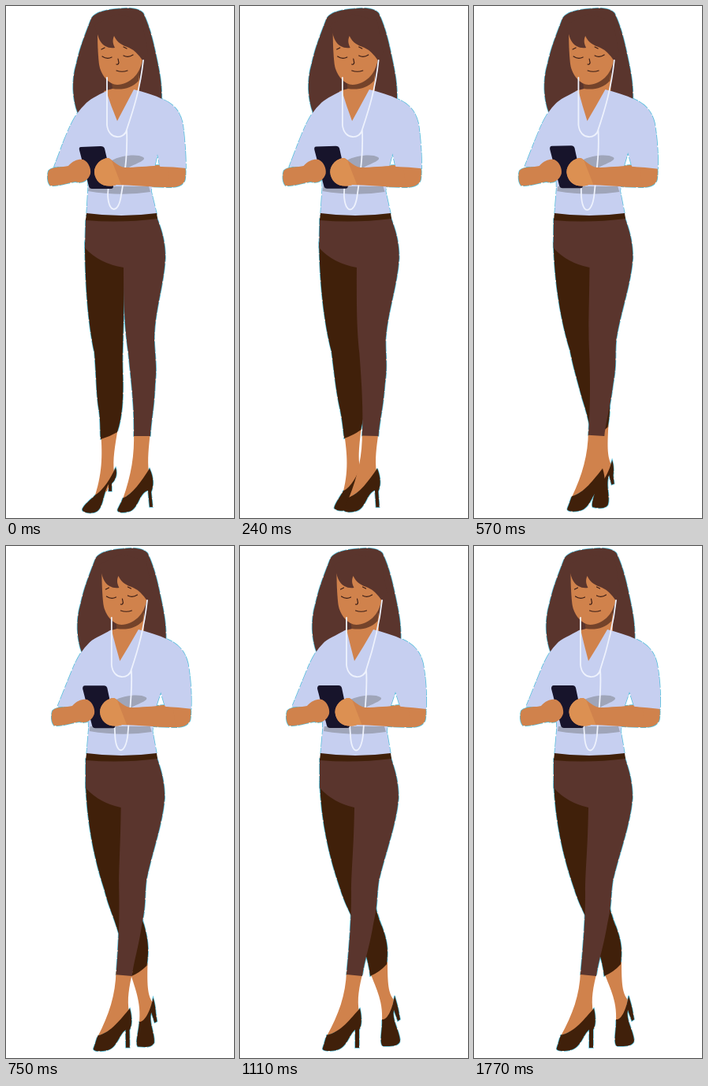
Animation, 289 px wide and 650 px high, one loop 1800 ms. Source, as an HTML page:

```html
<!DOCTYPE html>
<html lang="en">
<head>
<meta charset="utf-8">
<title>Walking with a phone</title>
<style>
  html, body { margin: 0; width: 100%; height: 100%; overflow: hidden; background: #fff; }
  svg { display: block; width: 100%; height: 100%; }
</style>
</head>
<body>
<svg id="stage" viewBox="0 0 289 650"><g id="fringe"></g><g id="body"></g></svg>
<script>
const LOOP = 1800, STEP = 30, STRIDE = 900;
const SKIN = '#d0824c', HAND = '#dc9052', BROWN = '#5a352d', DARK = '#40200a',
      SHIRT = '#c6cff0', SHADE = '#9fa5b9', PHONE = '#17142b', CORD = '#eef2fd', LINE = '#3a1d16';

const NS = 'http://www.w3.org/2000/svg';
const fringe = document.getElementById('fringe');
const body = document.getElementById('body');
const movers = [];

const numbers = path => path.match(/-?[\d.]+/g).map(Number);

// Blends two paths that share the same commands.
function blend(from, to) {
  const a = numbers(from), b = numbers(to);
  return p => {
    let i = 0;
    return from.replace(/-?[\d.]+/g, () => (a[i] + (b[i++] - a[i - 1]) * p).toFixed(2));
  };
}

function addPath(parent, attributes, path, change) {
  const node = document.createElementNS(NS, 'path');
  for (const key in attributes) node.setAttribute(key, attributes[key]);
  node.setAttribute('d', path);
  parent.append(node);
  if (typeof change === 'number') {
    movers.push(p => node.setAttribute('transform', `translate(${change * p})`));
  } else {
    const shape = blend(path, change);
    movers.push(p => node.setAttribute('d', shape(p)));
  }
}

// `change` is either a horizontal shift or the path at the end of the stride.
function fill(color, path, change, edged = false) {
  if (edged) {
    addPath(fringe, { fill: 'none', stroke: '#55bfdc', 'stroke-width': 1.5,
      'stroke-dasharray': '14 1 8 2' }, path, change);
  }
  addPath(body, { fill: color }, path, change);
}

function line(color, width, path, change) {
  addPath(body, { fill: 'none', stroke: color, 'stroke-width': width,
    'stroke-linecap': 'round', 'stroke-linejoin': 'round' }, path, change);
}

// Far leg
fill(SKIN, 'M120 540C122 565 123 590 113 621L128 616L137 592C135 575 138 560 142 535Z',
           'M164 538C170 558 182 575 180 604L188 606L195 576C188 568 187 555 187 528Z');
fill(DARK, 'M139 586C142 595 138 603 134 606L134 616L130 616L130 607C122 620 124 640 112 643C104 645 95 642 97 638C100 632 108 626 113 621C124 614 132 600 139 586Z',
           'M196 571C198 578 200 584 201 590L203 601L200 603L195 589C192 601 202 615 203 628C201 636 190 635 181 635C176 630 181 612 180 601C187 602 193 588 196 571Z', true);
fill(DARK, 'M100 300C100 350 104 405 112 440C115 475 114 490 118 515C120 530 119 540 120 550Q131 547 141 541C148 520 149 495 148 465C147 440 150 400 150 330Z',
           'M101 300C103 350 113 395 127 435C134 458 141 466 147 485C155 505 163 525 165 546Q177 541 186 531C188 512 187 502 180 483C173 465 165 440 147 330Z', true);

// Near leg
fill(SKIN, 'M162 540C163 570 159 595 148 626L166 612L181 592C179 575 181 560 183 540Z',
           'M135 540C134 570 125 595 110 622L133 611L151 592C148 575 151 560 156 540Z');
fill(DARK, 'M182 587C188 600 187 610 184 617L186 636L182 636L180 615C168 618 168 640 155 642C147 644 139 643 142 638C145 632 147 628 148 625C160 620 172 603 182 587Z',
           'M152 587C155 600 154 610 151 614L151 637L146 637L146 614C138 620 136 637 122 640C112 642 103 641 105 637C107 631 108 626 110 621C128 617 140 600 152 587Z', true);
fill(BROWN, 'M101 270L191 268C198 286 202 300 202 320C200 355 189 385 188 420C188 440 192 455 189 480C188 510 184 525 183 546L162 546C163 510 159 480 155 440C151 410 149 390 149 332Q118 327 100 307Z',
            'M101 270L191 268C197 286 201 300 201 320C198 355 184 390 176 425C173 445 175 455 169 480C164 510 158 525 155 546L135 544C138 510 141 480 141 440C141 410 144 390 145 332Q118 326 101 307Z', true);

// Hair, neck and face
fill(BROWN, 'M91 136C84 118 83 94 89 74C94 50 103 30 108 16C114 6 132 4 148 3C162 2 169 4 174 9C184 30 188 52 193 76C197 96 198 110 197 126L150 140Z', 6.5, true);
fill(SKIN, 'M135 90L169 85L169 108L164 120L141 148L124 108L135 105Z',
           'M142 90L176 85L176 108L169 120L145 148L131 108L142 105Z');
fill('#74432a', 'M134 97L170 80L168 95C160 104 148 107 135 105Z', 6.5);
fill(SKIN, 'M116 34C116 52 117 66 118 74C120 88 131 100 141 100C156 99 170 88 173 68L172 40Z', 6.5);
fill(BROWN, 'M112 24L116 36C118 44 122 49 126 51Q131 54 138 53C135 47 135 43 137 38C141 47 148 50 156 53Q165 57 173 69L180 60L172 18L140 10Z', 6.5);
line(LINE, 1.2, 'M122 64Q128 68 134 65M149 63Q155 66 161 62M121 55L125 53M149 52L153 54M142 67L143 72Q142 75 140 74M140 82Q147 84.5 154 82', 6.5);

// Sleeved arms pass beneath the hems
const nearArm = 'M112 211C112 201 121 193 130 193C135 195 140 203 150 205C165 205 180 203 192 202L224 203C229 204 228 212 227 220C225 229 214 231 202 230C180 230 158 227 140 227C126 232 113 225 112 211Z';
fill(SKIN, nearArm, 8, true);
fill(SHIRT, 'M127 108C115 114 105 119 100 125C87 137 80 155 73 172L61 204L104 204L104 232L102 266Q145 271 191 264L184 235L188 206L192 188L195 204Q212 204 228 206C228 185 226 165 224 149C220 132 211 124 200 119C188 113 175 109 162 106Q151 127 141 146Q133 127 127 108Z',
            'M135 106C121 114 110 118 105 124C92 137 86 155 79 172L66 204L104 204L105 232L102 266Q145 271 191 264L186 235L190 206L197 185L203 204Q220 205 236 207C237 185 235 165 232 149C228 132 218 124 207 119C194 113 181 109 169 106Q157 127 145 146Q140 127 135 106Z', true);
fill(DARK, 'M102 263Q146 269 191 263L192 270Q146 276 101 272Z', 0);
fill(SHADE, 'M134 196C145 190 166 187 174 192C179 196 164 200 154 206L135 206Z', 4);
fill(SHADE, 'M105 229L181 229L183 236Q145 242 104 235Z', 2);

// Earphones
line(CORD, 1.8, 'M174 69C170 105 162 130 153 157C151 169 130 171 128 151L128 91M153 157C154 185 152 205 146 240C143 264 130 264 129 240L130 226',
                'M180 69C176 105 169 130 160 157C158 169 137 171 135 151L135 91M160 157C162 185 158 205 156 240C153 266 141 266 140 240L139 226');

// Phone between the hands
fill(PHONE, 'M95 179L120 178Q124 178 125 181L136 229Q136 232 133 232L109 232Q106 232 105 229L93 183Q92 179 95 179Z',
            'M101 177L125 177Q128 177 129 180L139 228Q139 231 136 231L114 231Q111 231 110 228L98 181Q98 177 101 177Z');
fill(SKIN, 'M54 209C60 203 72 205 79 203C85 196 92 194 98 195C105 198 108 207 107 213C104 222 96 226 88 223C77 225 66 229 56 228C52 223 52 214 54 209Z', 6, true);
fill(SKIN, 'M112 211C112 201 121 193 130 193C135 195 140 203 150 205C165 205 180 203 192 203L205 206L208 230C180 230 158 227 140 227C126 232 113 225 112 211Z', 8.5);
fill(HAND, 'M112 211C112 201 121 193 130 193L134 196L146 227L140 227C126 232 113 225 112 211Z', 8.5);

function draw(now) {
  const time = Math.floor(now % LOOP / STEP) * STEP;
  const progress = Math.min(1, time / STRIDE);
  movers.forEach(move => move(progress));
  requestAnimationFrame(() => draw(performance.now() - start));
}
const start = performance.now();
draw(0);
</script>
</body>
</html>
```
